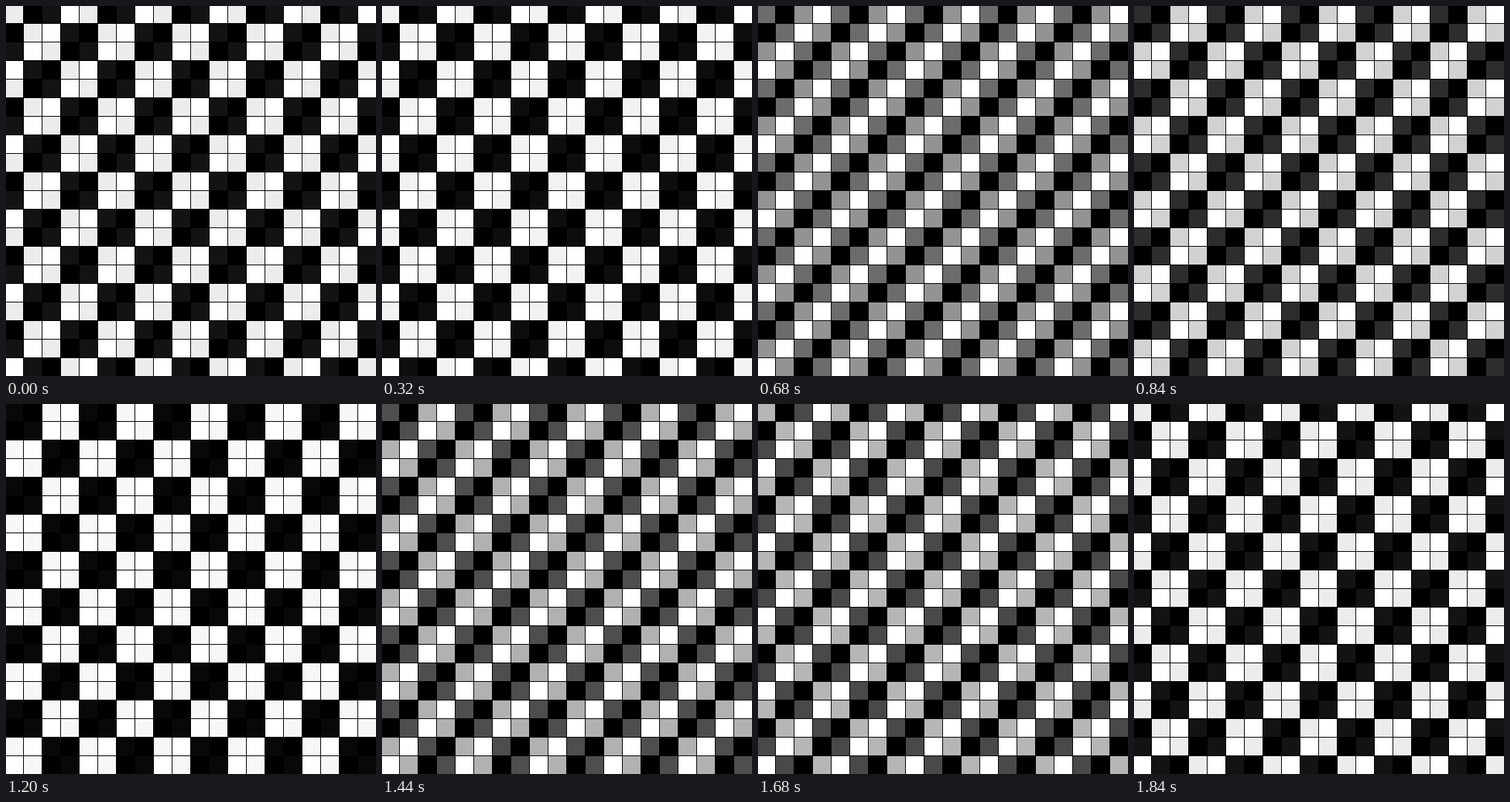
An HTML page with a canvas for the animation above (1880 ms loop, 498 by 498 pixels).

```html
<!DOCTYPE html>
<html lang="en">
<head>
<meta charset="utf-8">
<title>Shifting checkerboard</title>
<style>
  html, body { margin: 0; width: 100%; height: 100%; overflow: hidden; background: #000; }
  canvas { display: block; }
</style>
</head>
<body>
<canvas width="498" height="498"></canvas>
<script>
const ctx = document.querySelector('canvas').getContext('2d');
const LOOP = 1880, TICK = 40, STEPS = 45;
const CELL = 25, COUNT = 20;

const gray = v => {
  const g = Math.round(Math.min(255, Math.max(0, v)));
  return `rgb(${g},${g},${g})`;
};

function draw(time) {
  // The first pose is held for one extra tick.
  const step = Math.max(0, Math.floor(time % LOOP / TICK) - 1);
  const angle = 2 * Math.PI * step / STEPS - 0.54;
  const fade = 127.5 + 127.5 * Math.cos(angle) - 4 * Math.sin(angle) ** 2;
  const tones = [gray(fade), '#000', gray(255 - fade), '#fff'];

  ctx.fillStyle = '#000';
  ctx.fillRect(0, 0, 498, 498);
  for (let row = 0; row < COUNT; row++) {
    for (let col = 0; col < COUNT; col++) {
      ctx.fillStyle = tones[(row ^ col) & 3];
      // The 1px gaps between cells form the black grid.
      ctx.fillRect(col * CELL - 1, row * CELL - 1, CELL - 1, CELL - 1);
    }
  }
}

const start = performance.now();
function frame() {
  draw(performance.now() - start);
  requestAnimationFrame(frame);
}
frame();
</script>
</body>
</html>
```
